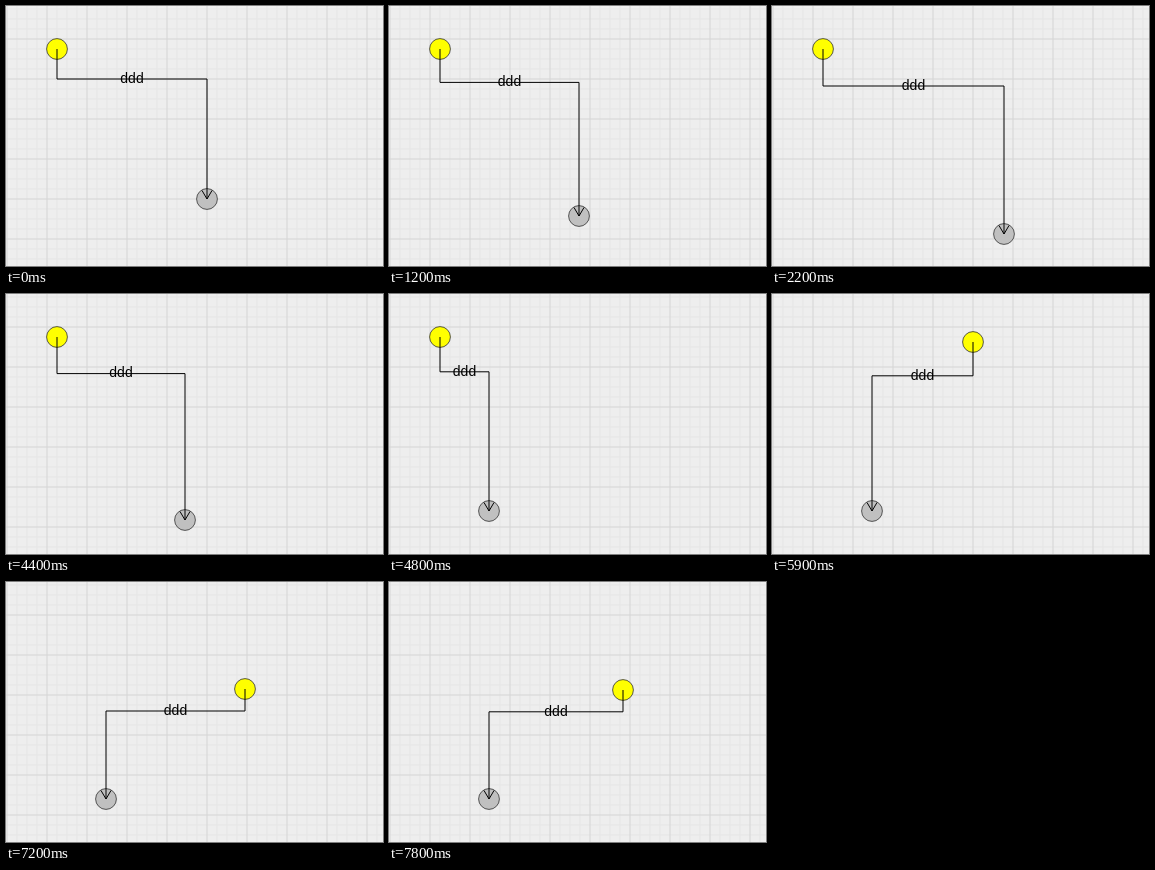
Animation of 377x260 px, one loop 8.8 s. Source, as an HTML page:

```html
<!DOCTYPE html>
<html lang="en">
<head>
<meta charset="utf-8">
<title>Connected nodes</title>
<style>
  html, body { margin: 0; width: 100%; height: 100%; overflow: hidden; background: #eee; }
  svg { display: block; width: 377px; height: 260px; }
  text { font: 14px "Liberation Sans", Arial, sans-serif; text-anchor: middle; }
</style>
</head>
<body>
<svg viewBox="0 0 377 260">
  <defs>
    <pattern id="grid" x="1" y="33" width="40" height="40" patternUnits="userSpaceOnUse">
      <path d="M10 0V40M20 0V40M30 0V40M0 10H40M0 20H40M0 30H40" stroke="#e5e5e5"/>
      <path d="M0 0H40V40H0Z" fill="none" stroke="#d4d4d4"/>
    </pattern>
  </defs>
  <rect width="377" height="260" fill="#eee"/>
  <rect width="377" height="260" fill="url(#grid)"/>
  <g stroke="#333" stroke-width=".8">
    <circle id="start" r="10.4" fill="#ff0"/>
    <circle id="end" r="10.4" fill="#c0c0c0"/>
  </g>
  <path id="link" fill="none" stroke="#000"/>
  <text id="label">ddd</text>
</svg>
<script>
const LOOP = 8800, TICK = 100;
const $ = id => document.getElementById(id);
const start = $('start'), end = $('end'), link = $('link'), label = $('label');

// Each drag is a Bezier curve through its control points
const drag = (from, to, ...points) => ({ from, to, points });
const startDrags = [
  drag(5500, 6100, [51, 43], [110, 50], [232, 50], [242, 45]),
  drag(6200, 7100, [242, 45], [271, 60], [271, 80], [240, 107]),
  drag(7100, 7800, [240, 107], [234, 108])
];
const endDrags = [
  drag(1100, 2000, [201, 193], [207, 251], [-180, 233], [224, 229]),
  drag(2000, 2200, [224, 229], [232, 228]),
  drag(4300, 4800, [232, 228], [129, 226], [104, 217], [100, 217])
];

function bezier(points, u) {
  while (points.length > 1) {
    points = points.slice(1).map((p, i) => p.map((v, k) => points[i][k] + (v - points[i][k]) * u));
  }
  return points[0];
}

function at(drags, t) {
  const d = drags.findLast(d => d.from <= t) || drags[0];
  const u = Math.min(1, Math.max(0, (t - d.from) / (d.to - d.from)));
  return bezier(d.points, u).map(Math.round);
}

function place(el, x, y) {
  el.setAttribute('transform', `translate(${x} ${y})`);
}

function draw(ms) {
  // Pointer positions are sampled ten times a second
  const t = Math.floor((ms % LOOP) / TICK) * TICK;
  const [ax, ay] = at(startDrags, t), [bx, by] = at(endDrags, t);
  const bend = ay + (by - ay) * 0.2;
  place(start, ax, ay);
  place(end, bx, by);
  place(label, (ax + bx) / 2, bend + 3.8);
  link.setAttribute('d',
    `M${ax} ${ay}V${bend}H${bx}V${by}M${bx - 5} ${by - 8.5}L${bx} ${by}L${bx + 5} ${by - 8.5}`);
}

const began = performance.now();
function frame() {
  draw(performance.now() - began);
  requestAnimationFrame(frame);
}
frame();
</script>
</body>
</html>
```
